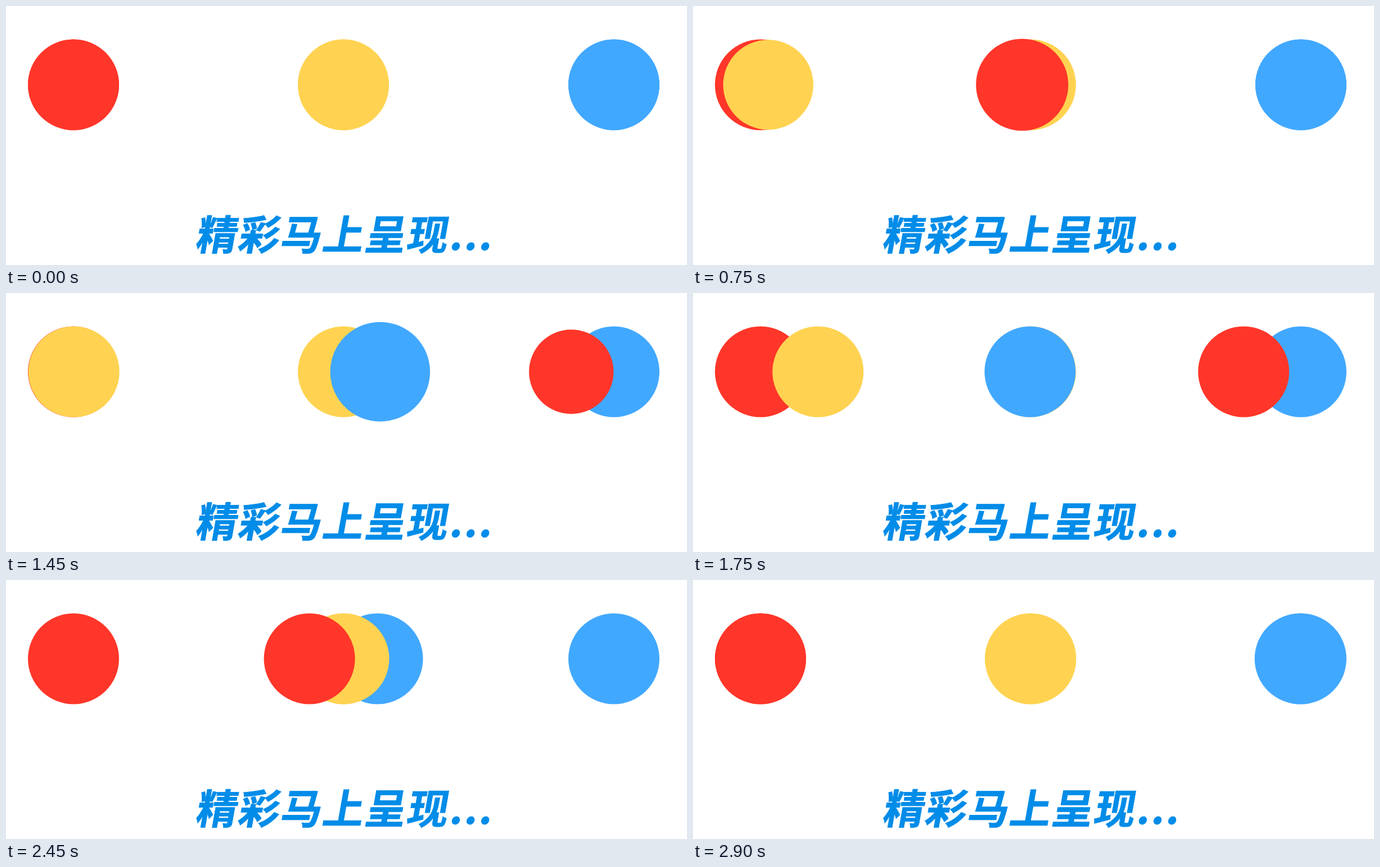
An HTML page for the animation above (2.95 s loop, 1211 by 462 pixels).

```html
<!DOCTYPE html>
<html lang="zh-CN">
<head>
<meta charset="utf-8">
<style>
html, body { margin: 0; width: 100%; height: 100%; overflow: hidden; background: #fff; }
svg { display: block; width: 1211px; height: 462px; }
text {
  font: bold 73px "Noto Sans CJK SC", "Noto Sans CJK", sans-serif;
  text-anchor: middle; fill: #008ce8; stroke: #008ce8; stroke-width: .9px;
}
</style>
</head>
<body>
<svg viewBox="0 0 1211 462">
  <g id="balls"></g>
  <text transform="translate(0 435.3) skewX(-10)" x="372 447 522 597 672 747 799 825 851">精彩马上呈现...</text>
</svg>
<script>
const LOOP = 2950, R = 81, CY = 140.5;
const RED = '#ff3629', YELLOW = '#ffd351', BLUE = '#41a8ff';
const LEFT = 120, MID = 600, RIGHT = 1081;
const balls = document.getElementById('balls');

const mix = (a, b, p) => a + (b - a) * p;
const span = (t, start, length) => Math.min(1, Math.max(0, (t - start) / length));

// Cubic from 0 to 1 with slope a at the start and b at the end
const curve = (u, a = 0, b = 0) =>
  a * u * (1 - u) ** 2 + u * u * (3 - 2 * u) - b * u * u * (1 - u);

// Two half curves that meet in the middle with slope m
const swing = (u, a, m, z) =>
  u < .5 ? curve(2 * u, a, m) / 2 : 1 - curve(2 - 2 * u, z, m) / 2;

const circle = (color, x, scale = 1) =>
  `<circle cx="${x.toFixed(2)}" cy="${CY}" r="${(R * scale).toFixed(2)}" fill="${color}"/>`;

// Trade places: the front ball swells, the back one shrinks
function swap(t, start) {
  const u = span(t, start, 800);
  const bulge = curve(1 - Math.abs(2 * u - 1), 0, 1);
  return {
    front: swing(u, 1, 1.07, .28), grow: 1 + .4 * bulge,
    back: swing(u, 0, .33, .1), shrink: 1 - .3 * bulge
  };
}

// Fly out past the end, then settle back
function fling(t, peak) {
  return peak * curve(span(t, 2367, 388)) - (peak - 1) * curve(span(t, 2770, 120));
}

function movers(t) {
  if (t < 1600) {
    const a = swap(t, 5), b = swap(t, 805);
    const second = t >= 805;
    return [
      circle(YELLOW, mix(MID, 120.7, a.back), a.shrink),
      second ? circle(RED, mix(MID, RIGHT, b.back), b.shrink)
             : circle(RED, mix(LEFT, MID, a.front), a.grow),
      circle(BLUE, mix(RIGHT, 599.4, b.front), b.grow)
    ];
  }
  const gather = curve(span(t, 1600, 600), .38);
  const red = mix(RIGHT, MID, gather) - (MID - LEFT) * fling(t, 1.046);
  return [
    circle(BLUE, mix(599.4, 1079.7, fling(t, 1.058))),
    circle(YELLOW, mix(120.7, 600.5, gather)),
    circle(RED, red)
  ];
}

function draw() {
  const t = performance.now() % LOOP;
  balls.innerHTML = [
    circle(RED, LEFT), circle(YELLOW, MID), circle(BLUE, RIGHT), ...movers(t)
  ].join('');
  requestAnimationFrame(draw);
}
draw();
</script>
</body>
</html>
```
